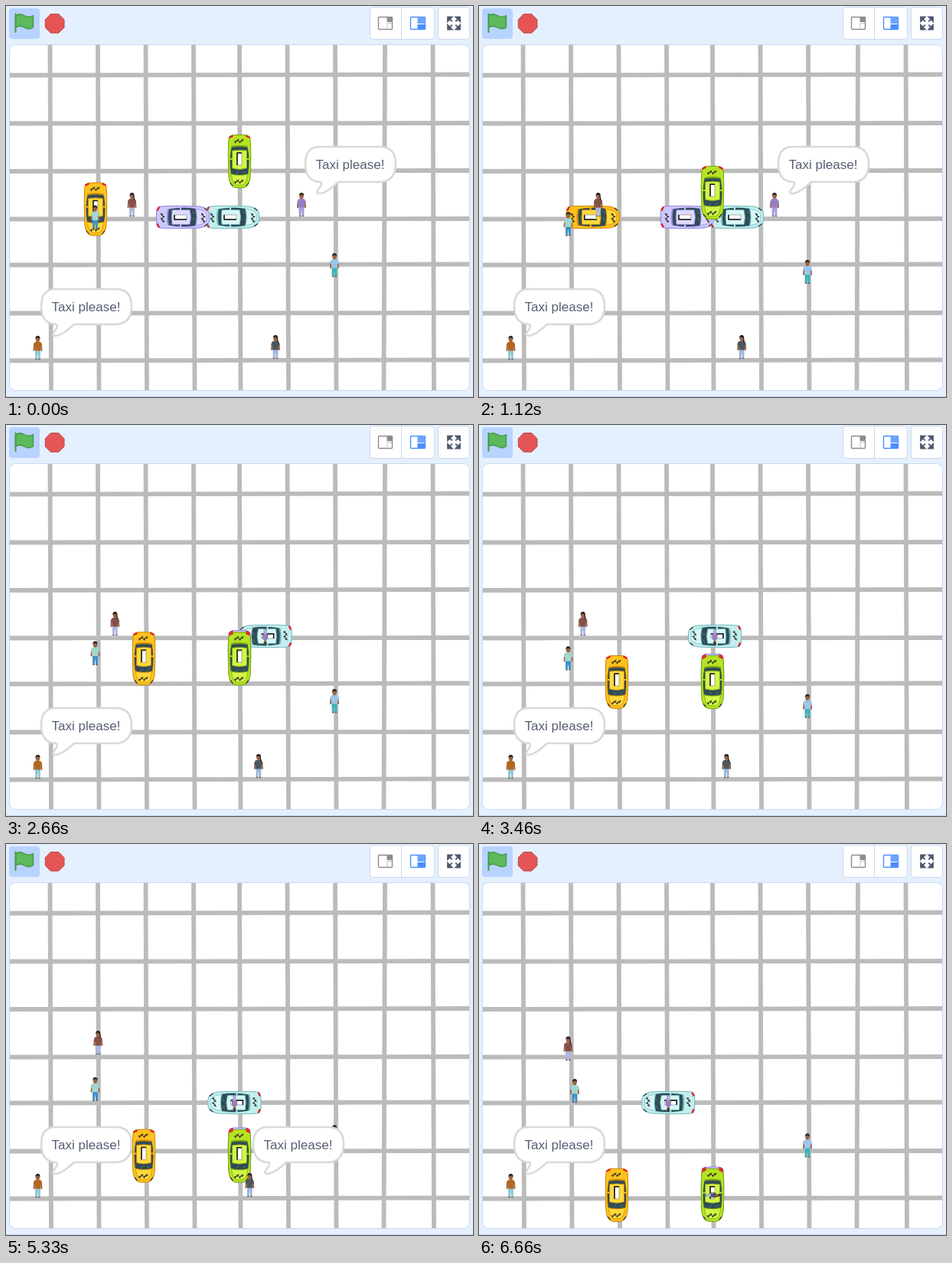
An HTML page for the animation above (6730 ms loop, 610 by 511 pixels).

```html
<!DOCTYPE html>
<html lang="en">
<head>
<meta charset="utf-8">
<title>Taxi grid</title>
<style>
  html, body { margin: 0; width: 100%; height: 100%; overflow: hidden; background: #e5f0ff; }
  svg { display: block; width: 610px; height: 511px; }
  text { font: 17px "Liberation Sans", Arial, sans-serif; fill: #575e75; text-anchor: middle; }
</style>
</head>
<body>
<svg viewBox="0 0 610 511">
  <rect width="610" height="511" fill="#e5f0ff"/>
  <path d="M0 510.5H610" stroke="#c3d2e8"/>

  <rect x="4" y="3" width="40" height="40" rx="4" fill="#b8d3ff"/>
  <path d="M12.5 12.5c4-2.6 8-2 11.500 0s7.500 2.600 11.500 0V28c-4 2.600-8 2-11.500 0s-7.500-2.600-11.500 0" fill="#5cb95c" stroke="#459945" stroke-width="1.400" stroke-linejoin="round"/>
  <path d="M12.500 10.500V34" stroke="#459945" stroke-width="2" stroke-linecap="round"/>
  <path d="M58.300 10.500h10.400l7.300 7.300v10.400l-7.300 7h-10.400l-7-7v-10.400z" fill="#e55555" stroke="#b84848" stroke-linejoin="round"/>

  <g fill="#fff" stroke="#cbd8ec">
    <rect x="475.500" y="1.500" width="84" height="42" rx="4"/>
    <path d="M516.500 1.500V43.500"/>
    <rect x="564.500" y="1.500" width="41" height="42" rx="4"/>
    <rect x="4.500" y="50.500" width="601" height="452" rx="8"/>
  </g>
  <rect x="486.500" y="14.500" width="18" height="16" rx="1" fill="#fff" stroke="#8c8c8c" stroke-width="1.400"/>
  <path d="M497.500 14.500h7v6.500h-7z" fill="#8c8c8c"/>
  <path d="M498 22.500v8M498 22.500h6" stroke="#c4c4c4"/>
  <rect x="528.500" y="14.500" width="19" height="16" rx="1" fill="#fff" stroke="#4c8dff" stroke-width="1.400"/>
  <path d="M537.500 14.500h10v8.500h-10z" fill="#6ba5ff"/>
  <path d="M537.500 24h10v6.500h-10z" fill="#4c8dff"/>
  <g id="arrows" fill="#4d5870" stroke="#4d5870"></g>

  <g id="grid" stroke="#bbb" stroke-width="5.800"></g>
  <g id="cars"></g>
  <g id="people"></g>
  <g id="bubbles"></g>
</svg>
<script>
const LOOP = 6730, FRAMES = 101, STEP = LOOP / FRAMES;
const DRIVE = 0.0384, WALK = 0.0083;
const RIGHT = 0, DOWN = 90, LEFT = 180;
const NS = "http://www.w3.org/2000/svg";
const layer = id => document.getElementById(id);

function add(id, markup) {
  const g = document.createElementNS(NS, "g");
  g.innerHTML = markup;
  layer(id).append(g);
  return g;
}

// Position on a route of legs: [start time, x, y, heading]
function along(route, speed, t) {
  const [t0, x, y, dir] = route.filter(leg => leg[0] <= t).pop();
  const d = (t - t0) * speed, a = dir * Math.PI / 180;
  return { x: x + Math.cos(a) * d, y: y + Math.sin(a) * d, dir };
}

// Top view, facing right
function carArt(body, roof, edge) {
  const checks = x => [-5, -2, 1, 4].map((y, i) =>
    `<path d="M${x + (i % 2) * 2} ${y}l2.500 1.500l-2 1" fill="none" stroke="#222" stroke-width="1.200"/>`).join("");
  return `
    <path d="M-30 -14Q-34.500 -13 -34.500 -6V6Q-34.500 13 -30 14Q-12 15.500 22 14Q34.500 12 34.500 4V-4Q34.500 -12 22 -14Q-12 -15.500 -30 -14Z" fill="${body}" stroke="${edge}"/>
    <path d="M-33.500 -8.500L-31 -13.500M-33.500 8.500L-31 13.500" stroke="#e3202c" stroke-width="2.400"/>
    <path d="M28 -12L32.500 -8.500M28 12L32.500 8.500" stroke="#333" stroke-width="1.200"/>
    <path d="M18 -10.500Q30 -9 31 -4V4Q30 9 18 10.500" fill="${roof}" stroke="${edge}" stroke-width=".7"/>
    <path d="M-20 -10.500Q0 -14.500 17 -11.500Q20 0 17 11.500Q0 14.500 -20 10.500Q-22 0 -20 -10.500Z" fill="${edge}"/>
    <path d="M-18 -10.500Q0 -13.500 16 -11Q19 0 16 11Q0 13.500 -18 10.500Q-20 0 -18 -10.500Z" fill="#304b55"/>
    <path d="M-14 -9.500H9Q12 0 9 9.500H-14Q-15.500 0 -14 -9.500Z" fill="${roof}" stroke="${edge}" stroke-width=".8"/>
    <path d="M-3 -12.500V-9.500M-3 12.500V9.500" stroke="${body}" stroke-width="2"/>
    <path d="M13 -8l3 4M13 1l4 4" stroke="#69838b" stroke-width=".8"/>
    <path d="M-11 -3H5V3H-11Z" fill="#fff" stroke="#777" stroke-width=".6"/>
    <path d="M-11 -3V3H5" fill="none" stroke="#111" stroke-width="1.500"/>
    ${checks(-29)}${checks(24)}`;
}

function personArt({ shirt, pants, skin = "#9a6444", long }) {
  return `
    <path d="M-3.600 2H3.600L3.200 14.500H.7L0 6L-.7 14.500H-3.200Z" fill="${pants}"/>
    <path d="M-3.200 14.500h2.500M.7 14.500h2.500" stroke="#6d6a6a" stroke-width="1.600"/>
    <path d="M-4.400 -5L-5 3M4.400 -5L5 3" stroke="${skin}" stroke-width="1.900" stroke-linecap="round"/>
    <path d="M-3 -8H3Q5.300 -7.500 5.500 -2H4L3.800 3.500H-3.800L-4 -2H-5.500Q-5.300 -7.500 -3 -8Z" fill="${shirt}"/>
    <ellipse cy="-11.500" rx="2.700" ry="3.800" fill="${skin}"/>
    <path d="M-3 -11.500Q-3.500 -16 0 -16T3 -11.500L${long ? "4 -6L2 -7L1.800 -12" : "2 -13"}Q0 -14 -2 -13Z" fill="#2b2422"/>`;
}

const bubbleArt = `
  <path d="M65 370H145Q164 371 164 392.500T145 416H89C80 424 72 431 64 431C59 431 62 427 65 423C68 419 67 416 65 416Q46 415 46 392.500T65 370Z"
    fill="#fff" stroke="#d9d9d9" stroke-width="2.600" stroke-linejoin="round"/>
  <text x="104.500" y="399">Taxi please!</text>`;

for (const a of [0, 90, 180, 270])
  layer("arrows").innerHTML += `<path transform="rotate(${a} 585 22.500)" d="M577 14.500h5.500l-5.500 5.500zM578 15.500l4.800 4.800" stroke-width="1.800"/>`;

[90, 153, 215.500, 278, 338, 401, 463].forEach((y, i) =>
  add("grid", `<path d="M5 ${y + .5}L605 ${y - (i % 2 ? 0 : .5)}"/>`));
[57.500, 120, 182.500, 245, 305, 367.500, 430, 495, 557.500].forEach((x, i) =>
  add("grid", `<path d="M${x} 51L${x + (i === 7 ? -1.500 : 1.500)} 502"/>`));

const car = (colors, route) => ({ node: add("cars", carArt(...colors)), route });
const cyan = car(["#c3eeee", "#d6f8f7", "#6fb9bb"],
  [[0, 296, 276, RIGHT], [1900, 368, 276, LEFT], [3530, 305, 276, DOWN], [5160, 305, 338, LEFT]]);
const purple = car(["#cdc8fb", "#dedaff", "#8f84e2"],
  [[0, 231, 276, RIGHT], [1960, 305, 276, DOWN]]);
const green = car(["#b5e322", "#d2f545", "#78a313"],
  [[0, 305, 203, DOWN]]);
const yellow = car(["#ffc21c", "#ffd93a", "#c88508"],
  [[0, 117, 265.500, DOWN], [240, 117, 276, RIGHT], [1890, 180, 275.500, DOWN]]);
const cars = [cyan, purple, green, yellow];

// stop: when walking ends; ride: the taxi taken, at time board
const person = (look, route, extra) =>
  ({ node: add("people", personArt(look)), route, stop: LOOP, board: LOOP, ...extra });
const people = [
  person({ shirt: "#a4d6d0", pants: "#3f8fc8" }, [[0, 116.500, 276.500, DOWN], [5700, 117, 323, RIGHT]]),
  person({ shirt: "#86504a", pants: "#adb8dc", long: true }, [[0, 164.500, 260, LEFT], [5750, 116.500, 260, DOWN]]),
  person({ shirt: "#9cc6ec", pants: "#3bb3b6" }, [[0, 429, 339, DOWN]]),
  person({ shirt: "#4e565f", pants: "#9db8da", long: true }, [[0, 352, 446, LEFT]],
    { stop: 4060, board: 5800, ride: green }),
  person({ shirt: "#b4661f", pants: "#8fc7d6" }, [[0, 41.500, 447, RIGHT]], { stop: 0 }),
  person({ shirt: "#957fc9", pants: "#a99bdc" }, [[0, 386, 260, RIGHT]],
    { stop: 0, board: 1800, ride: cyan })
];

const bubble = (dx, dy, from, to) => {
  const node = add("bubbles", bubbleArt);
  node.setAttribute("transform", `translate(${dx} ${dy})`);
  return { node, from, to };
};
const bubbles = [
  bubble(0, 0, 0, LOOP),
  bubble(345, -186, 0, 1800),
  bubble(277, 0, 4060, 5800)
];

function place(node, { x, y }, angle, scale = 1) {
  node.setAttribute("transform", `translate(${x.toFixed(2)} ${y.toFixed(2)}) rotate(${angle}) scale(${scale})`);
}

function draw(t) {
  for (const c of cars) {
    const pose = along(c.route, DRIVE, t);
    place(c.node, pose, pose.dir);
  }
  for (const p of people) {
    if (t >= p.board) {
      const pose = along(p.ride.route, DRIVE, t);
      place(p.node, pose, pose.dir, 0.62);
    } else {
      place(p.node, along(p.route, WALK, Math.min(t, p.stop)), 0);
    }
  }
  for (const b of bubbles)
    b.node.style.display = t >= b.from && t < b.to ? "" : "none";
}

const start = performance.now();
function tick() {
  const t = (performance.now() - start) % LOOP;
  draw(Math.floor((t + 5) / STEP) % FRAMES * STEP);
  requestAnimationFrame(tick);
}
tick();
</script>
</body>
</html>
```
